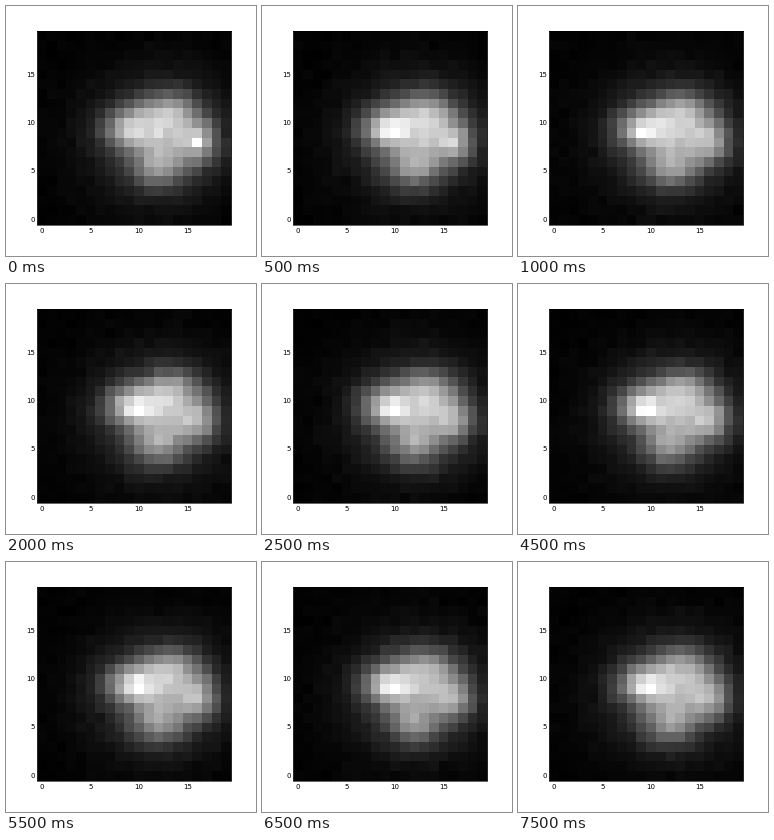
These frames come from a looping animation (250 px wide and 250 px high, 8000 ms). A matplotlib script:

```python
import numpy as np
import matplotlib.pyplot as plt
from matplotlib.animation import FuncAnimation

N = 20
FRAMES = 16
x, y = np.meshgrid(np.arange(N), np.arange(N))


def blob(amp, cx, cy, sx, sy):
    return amp * np.exp(-((x - cx) / sx) ** 2 / 2 - ((y - cy) / sy) ** 2 / 2)


glow = blob(70, 12.2, 8.5, 4.7, 4.1)
left = blob(135, 9.2, 9.5, 1.9, 1.4)
top = blob(112, 13.2, 11.1, 2.1, 1.5)
right = blob(118, 16.0, 8.1, 1.5, 1.5)
bottom = blob(105, 12.0, 5.6, 1.9, 1.6)
core = blob(50, 12.8, 8.6, 2.0, 1.5)
base = np.minimum(glow + left + top + right + bottom + core, 208)


def field(step):
    """Steady spot with counting noise; its peak fades right and sways left."""
    rng = np.random.default_rng(100 + step)
    noise = rng.normal(size=(N, N)) * (1 + 0.32 * np.sqrt(base))
    flare = np.exp(-2 * step)
    sway = 9.65 - 0.3 * np.cos(2 * np.pi * (step - 2) / 6.5)
    hot = blob(55 * (1 - flare), sway, 9.15, 0.9, 0.65)
    hot += blob(60 * flare, 16, 8, 0.5, 0.5)
    z = np.clip(base + noise + hot + 2, 0, None)
    return z / z.max()


plt.rcParams["font.family"] = "DejaVu Sans"
fig = plt.figure(figsize=(2.5, 2.5), dpi=100, facecolor="white")
ax = fig.add_axes([0.125, 0.1251, 0.775, 0.775])
edges = np.arange(N + 1) - 0.5
mesh = ax.pcolormesh(edges, edges, field(0), cmap="gray", vmin=0, vmax=1)
ax.set(xlim=(-0.5, N - 0.5), ylim=(-0.5, N - 0.5),
       xticks=range(0, N, 5), yticks=range(0, N, 5))
ax.tick_params(length=0, labelsize=5, pad=1.8)
ax.tick_params(axis="x", pad=2.4)
plt.setp(ax.get_yticklabels(), va="center")
for side, spine in ax.spines.items():
    spine.set_linewidth(0.72)
    spine.set_color({"top": "0", "bottom": "0.4"}.get(side, "0.15"))


def update(step):
    mesh.set_array(field(step))
    return [mesh]


anim = FuncAnimation(fig, update, frames=FRAMES, interval=500,
                     repeat=True, repeat_delay=0)
plt.show()
```
